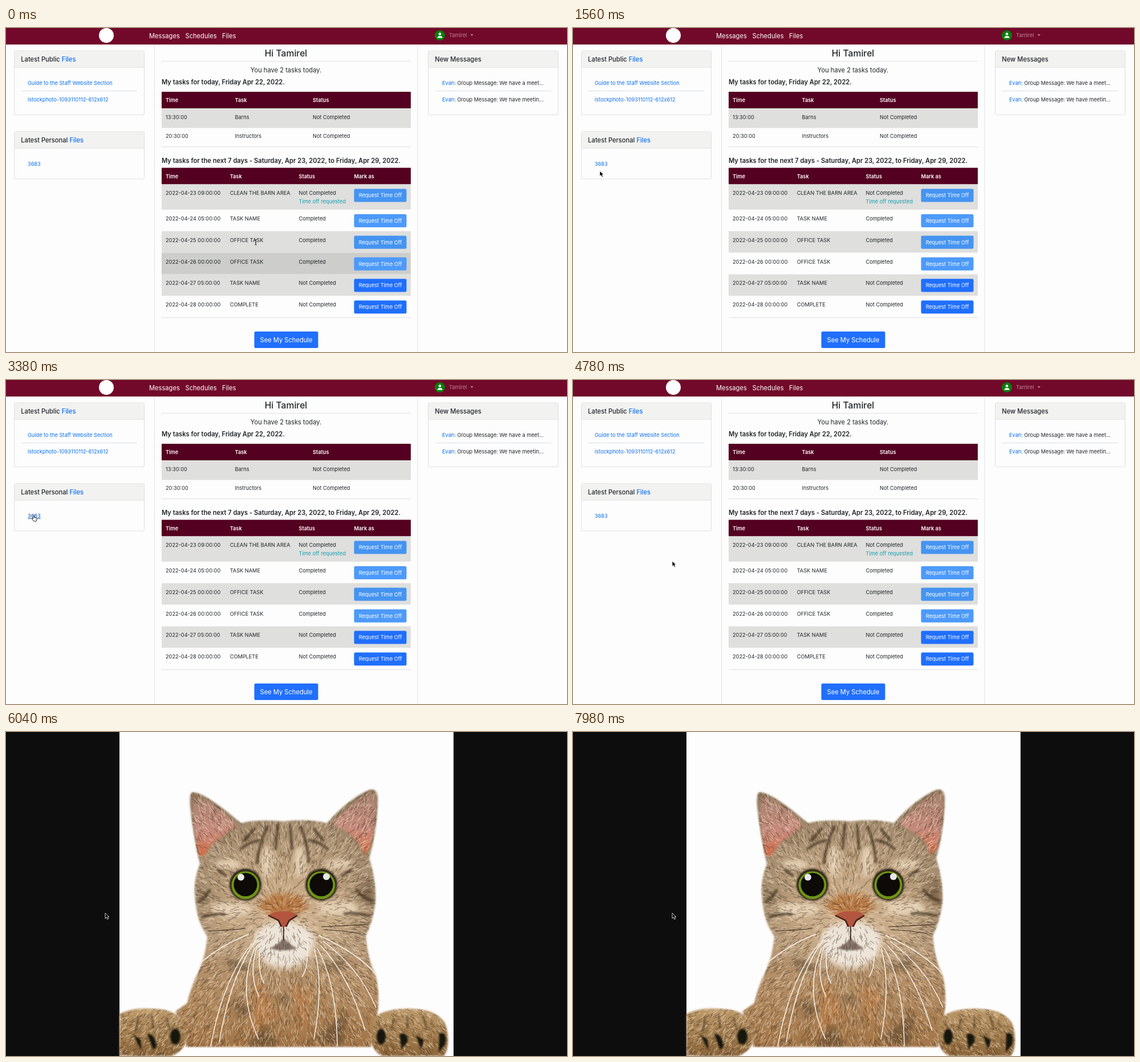
An HTML page that plays this animation: 984x569 px, repeating every 8 s.

```html
<!DOCTYPE html>
<html lang="en">
<head>
<meta charset="utf-8">
<title>Staff dashboard</title>
<style>
html, body { margin: 0; width: 100%; height: 100%; overflow: hidden; background: #fdfdfd; }
svg { display: block; width: 100vw; height: 100vh; font-family: Inter, Roboto, sans-serif; }
text { white-space: pre; }
</style>
</head>
<body>
<svg viewBox="0 0 984 569">
  <defs>
    <radialGradient id="headTone" gradientUnits="userSpaceOnUse" cx="487" cy="335" r="225">
      <stop offset="0" stop-color="#d8bb9b"/><stop offset=".4" stop-color="#c0a37f"/>
      <stop offset=".75" stop-color="#a88f71"/><stop offset="1" stop-color="#947b5f"/>
    </radialGradient>
    <linearGradient id="bodyTone" x2="0" y2="1">
      <stop stop-color="#b89b7b"/><stop offset=".5" stop-color="#b18b62"/><stop offset="1" stop-color="#a27446"/>
    </linearGradient>
    <linearGradient id="pawTone" x2="0" y2="1">
      <stop stop-color="#bd9a6a"/><stop offset="1" stop-color="#8c6539"/>
    </linearGradient>
    <linearGradient id="earTone" x2="0" y2="1">
      <stop stop-color="#a5826f"/><stop offset=".6" stop-color="#c78a7b"/><stop offset="1" stop-color="#cf6a45"/>
    </linearGradient>
    <filter id="soft" x="-50%" y="-50%" width="200%" height="200%"><feGaussianBlur stdDeviation="5"/></filter>
    <filter id="fuzzy" x="-10%" y="-10%" width="120%" height="120%"><feGaussianBlur stdDeviation="1.6"/></filter>
    <path id="head" d="M340 232Q328 180 323 130Q321 104 329 106Q350 107 412 160Q440 153 487 157Q530 152 563 160Q600 118 636 102Q654 96 652 125Q650 178 637 222Q650 262 648 300Q643 335 631 358Q600 418 487 420Q380 416 349 352Q334 330 331 285Q329 260 340 232Z"/>
    <path id="body" d="M353 360Q350 398 331 435Q321 460 318 476L297 491Q315 518 316 553H640L652 490Q656 460 648 425Q634 400 631 355Z"/>
    <path id="paws" d="M199 495Q222 483 255 486Q292 486 306 503Q320 523 314 549Q306 563 290 569H199ZM638 530Q638 502 662 492Q690 483 725 487Q756 490 770 511Q779 535 773 560L768 569H660Q640 559 638 530Z"/>
    <clipPath id="coat"><use href="#head"/><use href="#body"/><use href="#paws"/></clipPath>
  </defs>

  <g id="page"></g>

  <g id="photo" display="none">
    <path fill="#0d0d0d" d="M0 0H984V569H0Z"/>
    <path fill="#fdfdfd" d="M199 0H785V569H199Z"/>
    <g filter="url(#fuzzy)">
      <use href="#body" fill="url(#bodyTone)"/>
      <use href="#head" fill="url(#headTone)"/>
    </g>
    <g clip-path="url(#coat)">
      <g filter="url(#soft)">
        <g fill="#e3cfb3">
          <ellipse cx="458" cy="228" rx="10" ry="27"/><ellipse cx="515" cy="228" rx="10" ry="27"/>
          <ellipse cx="395" cy="312" rx="36" ry="13"/><ellipse cx="583" cy="310" rx="36" ry="13"/>
          <ellipse cx="390" cy="232" rx="24" ry="8"/><ellipse cx="585" cy="232" rx="24" ry="8"/>
        </g>
        <path fill="#b87a45" d="M466 284L511 284L532 306L510 322L462 322L440 306Z"/>
        <path fill="#ede4d9" d="M463 337Q487 330 512 337Q552 352 537 382Q522 414 487 414Q451 412 439 382Q424 352 463 337Z"/>
        <path fill="#56402b" opacity=".5" d="M395 467L430 485L412 510ZM470 460L500 465L488 480ZM535 540L600 490L590 553ZM420 553L455 505L478 553ZM385 395L435 412L400 425ZM540 412L600 395L590 420ZM640 255L606 290L645 305ZM336 270L362 285L340 310Z"/>
        <path fill="#b97b43" opacity=".6" d="M440 430L480 500L430 530ZM500 440L540 460L520 530Z"/>
      </g>
    </g>
    <g fill="url(#earTone)" filter="url(#fuzzy)">
      <path d="M329 117Q326 150 337 215L349 219Q354 197 390 176L404 163Q362 119 335 110Z"/>
      <path d="M648 112Q650 155 638 204L628 215Q621 188 590 171L573 161Q609 120 641 106Z"/>
    </g>
    <use href="#paws" fill="url(#pawTone)" filter="url(#fuzzy)"/>
    <g clip-path="url(#coat)">
      <path id="darkFur" fill="none" stroke="#453222" stroke-opacity=".42" stroke-width="1.300"/>
      <path id="lightFur" fill="none" stroke="#f3e2c8" stroke-opacity=".45" stroke-width="1.300"/>
      <g fill="none" stroke="#3f2e20" stroke-opacity=".65" stroke-width="5" stroke-linecap="round" filter="url(#fuzzy)">
        <path d="M440 230Q443 200 458 166M473 205L477 163M502 205L498 163M531 228Q530 199 517 166M418 190L436 170M556 190L540 170M412 205Q428 193 444 190M564 205Q550 193 533 190"/>
        <path d="M338 298Q350 292 357 278M345 325Q365 318 383 320M642 296Q625 292 615 277M637 323Q610 316 594 319M385 252L372 242M590 252L605 242"/>
        <path stroke-width="3" d="M232 500L228 525M256 498L258 520M282 502L287 522M680 504L676 524M704 498L704 520M732 500L738 522"/>
      </g>
    </g>
    <g id="eyes"></g>
    <path fill="#b4553f" d="M460 322Q473 313 487 315Q502 313 511 322L497 330L493 342H481L478 330Z"/>
    <path fill="none" stroke="#3b211b" stroke-width="2.500" d="M460 322L478 331L483 342M511 322L497 331L491 342"/>
    <path fill="none" stroke="#47372f" stroke-width="2" d="M487 342V367"/>
    <path fill="#59443a" opacity=".7" filter="url(#fuzzy)" d="M462 380Q479 373 487 361Q496 373 511 380Q487 387 462 380Z"/>
    <path fill="none" stroke="#3b3028" d="M420 345Q390 349 355 349M553 342Q595 340 636 338M557 347Q590 348 622 354"/>
    <path fill="none" stroke="#f8f4ed" stroke-width="1.500" d="M426 355Q375 375 337 409M432 371Q380 435 359 552M438 366Q393 430 374 545M436 380Q404 455 443 540M441 376Q424 425 444 465M446 378Q440 420 453 442M548 357Q620 390 651 428M556 367Q620 415 649 484M552 375Q603 430 630 525M546 380Q580 440 581 551M541 381Q558 445 540 540M528 376Q531 414 519 430"/>
    <g fill="#19120e" filter="url(#fuzzy)">
      <ellipse cx="297" cy="535" rx="9" ry="14"/><ellipse cx="658" cy="535" rx="8" ry="14"/>
      <path d="M248 530Q262 530 264 553L258 558ZM223 531L236 540L238 560ZM690 531Q704 525 705 543L694 557ZM719 532L733 541L728 558ZM760 529Q776 526 770 549L759 563Z"/>
    </g>
  </g>

  <g id="arrow"><path d="M0 0V9.500L2.200 7.400L3.900 11L5.600 10.200L4 6.700H7Z" stroke="#fff" stroke-width=".8"/></g>
  <g id="hand"><path d="M-2.500 0Q-1.500 -1.500 -.5 0V3.500L3.600 4.300Q4.500 5 4 7L3 10H-1.500L-4.500 5.500Q-4 4.500-2.500 5.500Z" fill="#fff" stroke="#111" stroke-width=".9"/></g>
  <g id="beam"><path d="M-2 -4.500Q0 -4.500 0 -3Q0 -4.500 2 -4.500M0 -3V4M-2 5Q0 5 0 3.500Q0 5 2 5M-1 1.500H1" fill="none" stroke="#222" stroke-width=".9"/></g>
</svg>

<script>
const LOOP = 8000, PHOTO_AT = 4880, ROW_LEFT_AT = 100;
const BODY = 11.15, SMALL = 9.2;
const MAROON = '#72092a', HEADER = '#540020', STRIPE = '#dfdfdd', HOVER = '#cdcdcb';
const LINK = '#0d6ff0', BUTTON = '#206ffd', INK = '#212529';
const el = id => document.getElementById(id);

const box = (x, y, w, h, fill, extra = '') =>
  `<rect x="${x}" y="${y}" width="${w}" height="${h}" fill="${fill}" ${extra}/>`;
// y is the middle of the capitals
const label = (x, y, str, { size = SMALL, fill = INK, weight = 400, anchor = 'start', id = '' } = {}) =>
  `<text x="${x}" y="${y + size * 0.36}" font-size="${size}" fill="${fill}" font-weight="${weight}" text-anchor="${anchor}" id="${id}">${str}</text>`;
const blue = str => `<tspan fill="${LINK}">${str}</tspan>`;
const line = (x1, y1, x2, y2, color = '#dedfe3') =>
  `<path d="M${x1} ${y1}L${x2} ${y2}" stroke="${color}"/>`;

function card(x, y, h, title) {
  return box(x + .5, y + .5, 228, h, '#fdfdfd', 'stroke="#dfdfdf" rx="2.5"') +
    box(x + 1, y + 1, 227, 28.5, '#f2f2f1') + line(x, y + 29.5, x + 228, y + 29.5) +
    label(x + 12.3, y + 15, title, { size: BODY, weight: 500 });
}

function tableHead(y, columns) {
  return box(273, y, 437, 29, HEADER) +
    columns.map(([x, str]) => label(x, y + 15, str, { fill: '#fff', weight: 600 })).join('');
}

function button(x, y, w, h, str, size, fill = BUTTON) {
  return box(x, y, w, h, fill, 'rx="2.5"') +
    label(x + w / 2, y + h / 2, str, { size, fill: '#fff', anchor: 'middle' });
}

function navBar() {
  const links = [[251, 'Messages'], [314.5, 'Schedules'], [379, 'Files']];
  return box(0, 0, 984, 29, MAROON) + '<circle cx="176" cy="13" r="13" fill="#fff"/>' +
    links.map(([x, str]) => label(x, 13.5, str, { size: BODY, fill: '#fff' })).join('') +
    '<circle cx="761" cy="13" r="9" fill="#087d0b"/><circle cx="761" cy="10.500" r="2.300" fill="#fff"/>' +
    '<path d="M756.500 17.500Q756.500 14 761 14T765.500 17.500Z" fill="#fff"/>' +
    label(777, 12.5, 'Tamirel', { fill: '#b98495' }) + '<path d="M814.500 11H820L817.200 14Z" fill="#b98495"/>';
}

function sideCards() {
  const message = (y, str) => label(765, y, blue('Evan:') + ' ' + str);
  return card(14, 39.5, 112.5, 'Latest Public ' + blue('Files')) +
    label(38, 96.5, 'Guide to the Staff Website Section', { fill: LINK }) + line(26, 110.5, 230, 110.5) +
    label(38, 126, 'istockphoto-1093110112-612x612', { fill: LINK }) +
    card(14, 181.5, 83, 'Latest Personal ' + blue('Files')) +
    label(38, 238.5, '3683', { fill: LINK, id: 'fileLink' }) +
    card(740, 39.5, 112.5, 'New Messages') +
    message(97, 'Group Message: We have a meet...') + line(753, 110.5, 956, 110.5) +
    message(126, 'Group Message: We have meetin...');
}

function todayTable() {
  const row = (y, ...cells) => cells.map((str, i) => label([280, 401.5, 538][i], y, str)).join('');
  return label(273, 95, 'My tasks for today, Friday Apr 22, 2022.', { size: BODY, weight: 600 }) +
    tableHead(112, [[280, 'Time'], [401.5, 'Task'], [538, 'Status']]) +
    box(273, 141, 437, 34.5, STRIPE) +
    row(157, '13:30:00', 'Barns', 'Not Completed') +
    row(190, '20:30:00', 'Instructors', 'Not Completed') + line(273, 208.5, 710, 208.5);
}

function weekTable() {
  const tasks = [
    ['23 09', 'CLEAN THE BARN AREA', 'Not Completed', true],
    ['24 05', 'TASK NAME', 'Completed', true],
    ['25 00', 'OFFICE TASK', 'Completed', true],
    ['26 00', 'OFFICE TASK', 'Completed', true],
    ['27 05', 'TASK NAME', 'Not Completed', false],
    ['28 00', 'COMPLETE', 'Not Completed', false],
  ];
  const rows = tasks.map(([when, task, status, disabled], i) => {
    const y = i ? 281 + i * 37.9 : 274.5;
    const striped = i % 2 === 0;
    const fill = disabled ? (striped ? '#4594f1' : '#4d9afa') : BUTTON;
    return box(273, y, 437, i ? 37.9 : 44.5, striped ? STRIPE : '#fdfdfd', i === 3 ? 'id="hoverRow"' : '') +
      label(280, y + 15.5, `2022-04-${when}:00:00`) + label(392.7, y + 15.5, task) +
      label(513.5, y + 15.5, status) + button(610.5, y + 8, 92, 23, 'Request Time Off', SMALL, fill);
  }).join('');
  return label(273, 233, 'My tasks for the next 7 days - Saturday, Apr 23, 2022, to Friday, Apr 29, 2022.', { size: BODY, weight: 600 }) +
    tableHead(245.5, [[280, 'Time'], [392.7, 'Task'], [513.5, 'Status'], [610.5, 'Mark as']]) + rows +
    label(513.5, 304.5, 'Time off requested', { fill: '#169fb3' }) + line(273, 508.5, 710, 508.5);
}

el('page').innerHTML = box(0, 0, 984, 569, '#fdfdfd') +
  line(260.5, 29, 260.5, 569) + line(722, 29, 722, 569) + navBar() + sideCards() +
  label(491, 44, 'Hi Tamirel', { size: 15.7, weight: 500, anchor: 'middle' }) + line(273, 58.5, 710, 58.5) +
  label(491, 73.5, 'You have 2 tasks today.', { size: BODY, anchor: 'middle' }) +
  todayTable() + weekTable() + button(435.5, 533, 112, 29, 'See My Schedule', BODY);

el('eyes').innerHTML = [[420, 412, 255], [553, 562, 254]].map(([x, shineX, shineY]) =>
  `<circle cx="${x}" cy="268" r="28" fill="#2a2119" filter="url(#fuzzy)"/><circle cx="${x}" cy="269" r="24.500" fill="#6f9415"/>
   <circle cx="${x}" cy="268" r="20.500" fill="#0d0a08"/><circle cx="${shineX}" cy="${shineY}" r="6" fill="#e6e9e6"/>`).join('');

// Short hairs fanning out from the nose
let seed = 7;
const random = () => (seed = seed * 16807 % 2147483647) / 2147483647;
function fur(count) {
  let d = '';
  for (let i = 0; i < count; i++) {
    const x = 199 + random() * 580, y = 100 + random() * 469;
    const angle = Math.atan2(y - 320, x - 487) + random() - .5, length = 4 + random() * 8;
    d += `M${x.toFixed(1)} ${y.toFixed(1)}l${(Math.cos(angle) * length).toFixed(1)} ${(Math.sin(angle) * length).toFixed(1)}`;
  }
  return d;
}
el('darkFur').setAttribute('d', fur(4500));
el('lightFur').setAttribute('d', fur(4500));

// Pointer path: time, x, y
const path = [
  [0, 438, 376], [20, 438, 376], [400, 158, 279], [820, 68, 258], [1300, 47, 251],
  [2200, 47, 251], [2600, 50, 238], [3900, 50, 238], [4600, 174, 318], [LOOP, 174, 318],
];
function pointerAt(t) {
  const i = path.findIndex(key => key[0] > t);
  const [t0, x0, y0] = path[i - 1], [t1, x1, y1] = path[i];
  const p = (t - t0) / (t1 - t0);
  return [x0 + (x1 - x0) * p, y0 + (y1 - y0) * p];
}

function draw(now) {
  const t = now % LOOP;
  const [x, y] = pointerAt(t);
  const onRow = t < ROW_LEFT_AT;
  const onLink = x < 62 && y < 245;
  const shape = onRow ? 'beam' : onLink ? 'hand' : 'arrow';
  for (const id of ['arrow', 'hand', 'beam']) {
    el(id).setAttribute('display', id === shape ? 'inline' : 'none');
  }
  el(shape).setAttribute('transform', `translate(${x} ${y})`);
  el('hoverRow').setAttribute('fill', onRow ? HOVER : '#fdfdfd');
  el('fileLink').setAttribute('text-decoration', onLink ? 'underline' : 'none');
  el('fileLink').setAttribute('fill', onLink ? '#0a58b8' : LINK);
  el('photo').setAttribute('display', t >= PHOTO_AT ? 'inline' : 'none');
  requestAnimationFrame(draw);
}
draw(performance.now());
</script>
</body>
</html>
```
